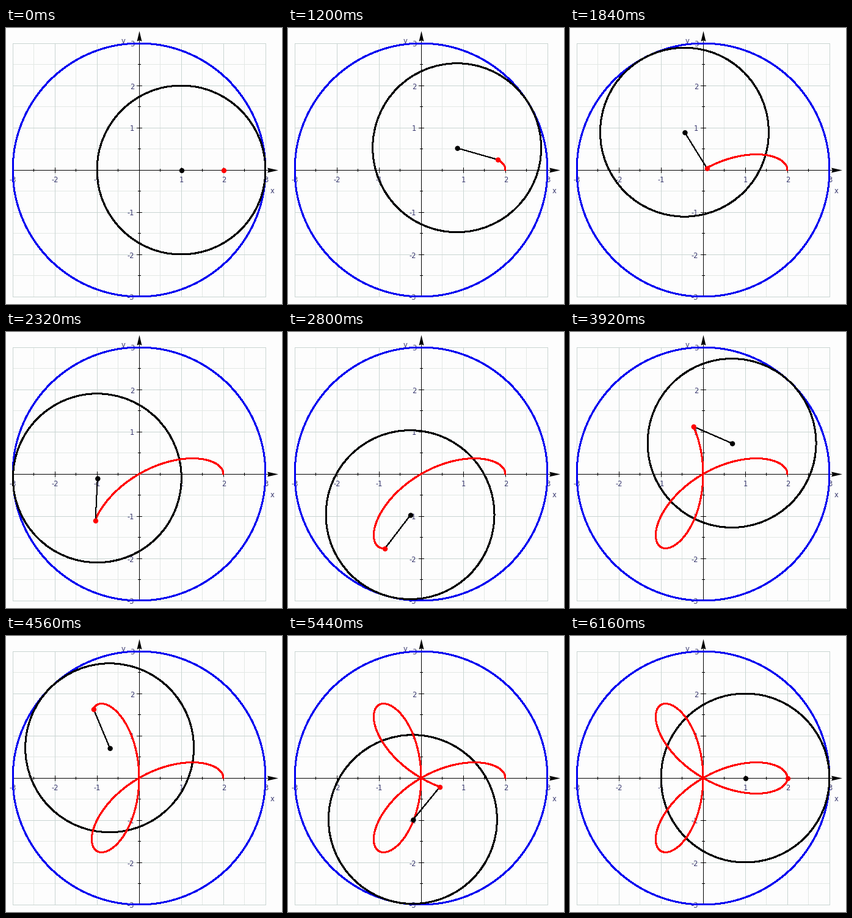
Recreate the animation shown at these times as a matplotlib script. Size 452x451 px, loop 6.24 s.

```python
import numpy as np
import matplotlib.pyplot as plt
from matplotlib.animation import FuncAnimation
from matplotlib.patches import Circle, Polygon

W, H, DPI = 452, 451, 64
PX = 72 / DPI                  # one pixel in points
OX, OY, UNIT = 218, 232, 69    # origin and scale in pixels
MID = 0.5                      # offset from a pixel's corner to its centre
STEP_MS, FRAMES, HOLD = 80, 78, 12
INK = "#3a3a70"

# Rolling angle in degrees against steps since the start; the pace varies slightly
PACE_STEPS = [0, 11, 23, 37, 45, 56, 65]
PACE_ANGLES = [0, 116.3, 254.9, 407, 494.5, 618.6, 720]

plt.rcParams["font.family"] = "DejaVu Sans"
fig = plt.figure(figsize=(W / DPI, H / DPI), dpi=DPI, facecolor="#fdfdfd")
ax = fig.add_axes([0, 0, 1, 1])
ax.set_xlim(0, W)
ax.set_ylim(H, 0)
ax.axis("off")


def to_px(x, y):
    return OX + UNIT * x, OY - UNIT * y


def segment(x0, y0, x1, y1, color="black", z=1.0):
    ax.plot([x0 + MID, x1 + MID], [y0 + MID, y1 + MID], color=color, lw=PX,
            zorder=z, solid_capstyle="projecting", snap=False)


def label(x, y, text, ha="center"):
    ax.text(x, y, text, ha=ha, va="baseline", color=INK,
            fontsize=11.5 * PX, zorder=3)


def ring(color, radius, z):
    return ax.add_patch(Circle((OX, OY), radius * UNIT, fill=False, ec=color,
                               lw=2 * PX, zorder=z, antialiased=False))


def dot(color, z):
    return ax.add_patch(Circle((OX, OY), 4.2, fc=color, ec="none", zorder=z))


def draw_grid():
    reach = 3 * UNIT
    for half in range(-6, 7):
        whole = half % 2 == 0
        color, z = ("#c9d5d2", 1) if whole else ("#e3e8e5", 0.5)
        x, y = (np.floor(v) for v in to_px(half / 2, half / 2))
        segment(x, OY - reach, x, OY + reach, color, z)
        segment(OX - reach, y, OX + reach, y, color, z)
        if half == 0:
            continue
        size = 4 if whole else 2
        segment(x, OY - size, x, OY + size, z=2)
        segment(OX - size, y, OX + size, y, z=2)
        if whole:
            label(x + MID, 252, str(half // 2))
            label(210.3, y + 5.5, str(half // 2), "right")


def draw_axes():
    segment(11, OY, 432, OY, z=2)
    segment(OX, 439, OX, 18, z=2)
    cx, cy = OX + MID, OY + MID
    heads = ([(446, cy), (428, cy - 4), (430, cy), (428, cy + 4)],
             [(cx, 5), (cx - 4, 22), (cx, 20), (cx + 4, 22)])
    for points in heads:
        ax.add_patch(Polygon(points, fc="black", ec="none", zorder=2))
    label(436.5, 270.5, "x")
    label(192, 24.5, "y")


def pen_point(t):
    return to_px(np.cos(t) + np.cos(t / 2), np.sin(t) - np.sin(t / 2))


draw_grid()
draw_axes()
ring("#0000f0", 3, 4)
roller = ring("black", 2, 5)
trail, = ax.plot([], [], color="red", lw=2 * PX, zorder=6, antialiased=False)
arm, = ax.plot([], [], color="black", lw=PX, zorder=7, antialiased=False,
               snap=False)
hub = dot("black", 8)
pen = dot("red", 9)


def update(frame):
    t = np.radians(np.interp(max(0, frame - HOLD), PACE_STEPS, PACE_ANGLES))
    cx, cy = to_px(np.cos(t), np.sin(t))
    px, py = pen_point(t)
    roller.center = cx, cy
    hub.center = cx + 1, cy + 1
    pen.center = px + 1, py + 1
    arm.set_data([cx + MID, px + MID], [cy + MID, py + MID])
    path = np.linspace(0, t, 400) if t > 0 else np.array([])
    trail.set_data(*pen_point(path))
    return roller, trail, arm, hub, pen


anim = FuncAnimation(fig, update, frames=FRAMES, interval=STEP_MS,
                     repeat=True, repeat_delay=0, blit=False)
plt.show()
```
